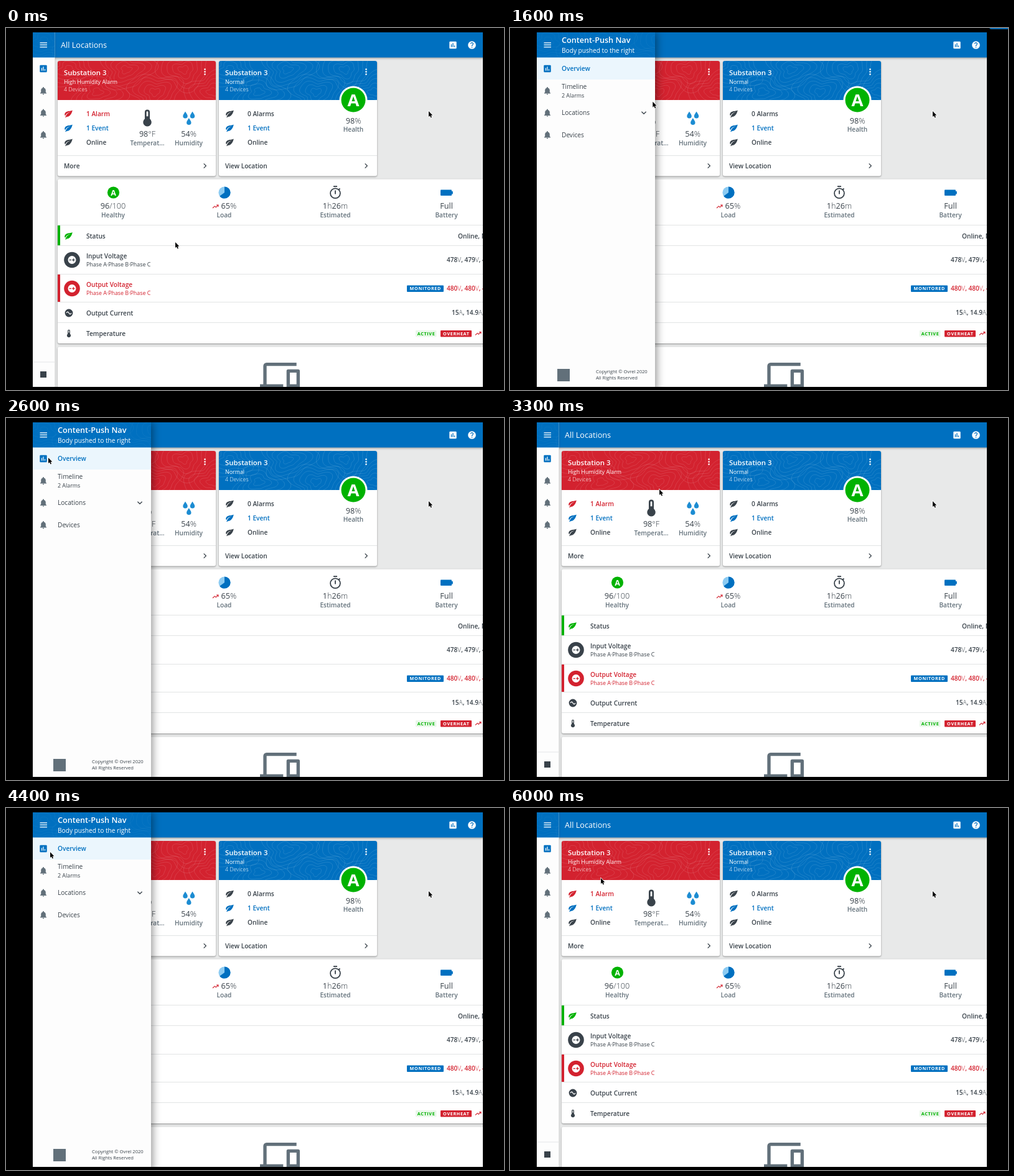
Animation of 800x583 px, one loop 6100 ms. Source, as an HTML page with a canvas:

```html
<!DOCTYPE html>
<html lang="en">
<head>
<meta charset="utf-8">
<title>Content-Push Nav</title>
<style>
html, body { margin: 0; width: 100%; height: 100%; overflow: hidden; background: #000; }
canvas { display: block; }
</style>
</head>
<body>
<canvas id="stage" width="800" height="583"></canvas>
<script>
const ctx = document.getElementById('stage').getContext('2d');
const LOOP = 6100, STEP = 100;
const BLUE = '#0070c0', RED = '#d3222f', GREEN = '#00b200', INK = '#39424a', GRAY = '#62707a', WHITE = '#fff';
const SMALL = 8.87, BODY = 10.13, LARGE = 12.66;

// Times at which the drawer is open, and the pointer's path as [time, x, y].
const openSpans = [[800, 1700], [2500, 3300], [4400, 5300]];
const cornerSpan = [400, 2400];
const pointerPath = [
  [0, 272, 345], [200, 250, 305], [700, 88, 115], [800, 70, 95], [1100, 72, 85],
  [1650, 245, 122], [1900, 138, 129], [2450, 75, 72], [2600, 68, 64], [2800, 72, 70],
  [3300, 240, 115], [3600, 236, 130], [3900, 148, 127], [4300, 80, 80], [4400, 71, 71],
  [4700, 74, 76], [5300, 240, 112], [5700, 226, 118], [6000, 146, 113]
];

const icons = {
  leaf: 'M17 8C8 10 5.9 16.2 3.8 21.3L5.7 22 6.7 19.7C7.1 19.9 7.6 20 8 20 19 20 22 3 22 3 21 5 14 5.3 9 6.3 4 7.3 2 11.5 2 13.5 2 15.5 3.75 17.25 3.75 17.25 7 8 17 8 17 8Z',
  bell: 'M12 22c1.1 0 2-.9 2-2h-4c0 1.1.9 2 2 2zm6-6v-5c0-3.1-1.6-5.6-4.5-6.3V4a1.5 1.5 0 0 0-3 0v.7C7.6 5.4 6 7.9 6 11v5l-2 2v1h16v-1z',
  chart: 'M5 3H19a2 2 0 0 1 2 2V19a2 2 0 0 1-2 2H5a2 2 0 0 1-2-2V5a2 2 0 0 1 2-2zM7 10v7h2v-7zM11 7v10h2V7zM15 13v4h2v-4z',
  help: 'M12 2a10 10 0 1 0 0 20 10 10 0 1 0 0-20zm1 17h-2v-2h2zm2.1-7.75l-.9.9C13.5 12.9 13 13.5 13 15h-2v-.5c0-1.1.5-2.1 1.2-2.8l1.2-1.3c.4-.4.6-.9.6-1.4a2 2 0 0 0-4 0H8a4 4 0 0 1 8 0c0 .9-.4 1.7-.9 2.25z',
  thermo: 'M15 13V5A3 3 0 0 0 9 5V13A5 5 0 1 0 15 13M12 4A1 1 0 0 1 13 5V10H11V5A1 1 0 0 1 12 4Z',
  drop: 'M12 3C14 7 18 11 18 15A6 6 0 0 1 6 15C6 11 10 7 12 3Z',
  devices: 'M4 6h18V4H4a2 2 0 0 0-2 2v11H0v3h14v-3H4zm19 2h-6a1 1 0 0 0-1 1v10a1 1 0 0 0 1 1h6a1 1 0 0 0 1-1V9a1 1 0 0 0-1-1zm-1 9h-4v-7h4z'
};
for (const name in icons) icons[name] = new Path2D(icons[name]);

function rect(x, y, w, h, color, radius = 0) {
  ctx.fillStyle = color;
  ctx.beginPath();
  ctx.roundRect(x, y, w, h, radius);
  ctx.fill();
}

function circle(x, y, r, color) {
  ctx.fillStyle = color;
  ctx.beginPath();
  ctx.arc(x, y, r, 0, Math.PI * 2);
  ctx.fill();
}

function line(points, color, width) {
  ctx.strokeStyle = color;
  ctx.lineWidth = width;
  ctx.beginPath();
  for (const [x, y] of points) ctx.lineTo(x, y);
  ctx.stroke();
}

function icon(name, cx, cy, color, scale = 0.633) {
  ctx.save();
  ctx.translate(cx, cy);
  ctx.scale(scale, scale);
  ctx.translate(-12, -12);
  ctx.fillStyle = color;
  ctx.fill(icons[name], 'evenodd');
  ctx.restore();
}

function setFont(size, weight) {
  ctx.font = `${weight} ${size}px "Open Sans", sans-serif`;
}

function text(str, x, y, color = INK, size = BODY, weight = 600, align = 'left') {
  setFont(size, weight);
  ctx.textAlign = align;
  ctx.fillStyle = color;
  ctx.fillText(str, x, y);
}

// Alternates strong and light runs, separated by "|".
function valueText(str, x, y, color = INK, size = BODY, centered = false) {
  const runs = str.split('|');
  const weight = i => i % 2 ? 300 : size === LARGE ? 500 : 600;
  if (centered) {
    runs.forEach((run, i) => { setFont(size, weight(i)); x -= ctx.measureText(run).width / 2; });
  }
  runs.forEach((run, i) => {
    text(run, x, y, color, size, weight(i));
    x += ctx.measureText(run).width;
  });
}

function clipped(x, y, w, h, draw) {
  ctx.save();
  ctx.beginPath();
  ctx.rect(x, y, w, h);
  ctx.clip();
  draw();
  ctx.restore();
}

function shadowed(blur, dx, dy, alpha, draw) {
  ctx.save();
  ctx.shadowColor = `rgba(0,0,0,${alpha})`;
  ctx.shadowBlur = blur;
  ctx.shadowOffsetX = dx;
  ctx.shadowOffsetY = dy;
  draw();
  ctx.restore();
}

function panel(x, y, w, h) {
  shadowed(2.5, 0, 1, 0.4, () => rect(x, y, w, h, WHITE, 3));
}

// Nested wavy rings that read as a topographic map.
function contours(x, y, w, h, alpha) {
  clipped(x, y, w, h, () => {
    ctx.strokeStyle = `rgba(255,255,255,${alpha})`;
    ctx.lineWidth = 0.6;
    for (let k = 0; k < 6; k++) {
      const cx = x + 18 + k * 46, cy = y + (k % 2 ? 50 : 14);
      for (let r = 6; r < 34; r += 6) {
        ctx.beginPath();
        for (let i = 0; i <= 60; i++) {
          const a = i / 60 * Math.PI * 2;
          const d = r * (1 + 0.2 * Math.sin(3 * a + k) + 0.1 * Math.sin(5 * a + r + k * 2));
          ctx.lineTo(cx + 1.35 * d * Math.cos(a), cy + d * Math.sin(a));
        }
        ctx.stroke();
      }
    }
  });
}

function trend(x, y) {
  line([[x, y + 2.5], [x + 3.3, y - 0.6], [x + 5.2, y + 1.2], [x + 8.8, y - 2.2]], RED, 1.1);
  line([[x + 6.2, y - 2.4], [x + 9, y - 2.4], [x + 9, y + 0.4]], RED, 1.1);
}

function chevron(x, y) {
  line([[x - 1.8, y - 3.6], [x + 1.8, y], [x - 1.8, y + 3.6]], INK, 1.3);
}

function tag(str, x, y, w, background, color) {
  rect(x, y, w, 10.5, background, 1);
  ctx.letterSpacing = '0.65px';
  text(str, x + w / 2 + 0.3, y + 7.9, color, 7.2, 700, 'center');
  ctx.letterSpacing = '0px';
}

function card(x, color, status, alarms, alarmColor, action) {
  panel(x, 53, 254, 185.5);
  rect(x, 53, 254, 63, color, [3, 3, 0, 0]);
  contours(x, 53, 254, 63, 0.2);
  text('Substation 3', x + 10, 76, WHITE, 11.4);
  text(status, x + 10, 90, WHITE, SMALL, 400);
  text('4 Devices', x + 10, 102, WHITE, SMALL, 300);
  for (let i = 0; i < 3; i++) circle(x + 236.5, 66.5 + i * 4, 1.3, WHITE);
  [[alarms, alarmColor], ['1 Event', BLUE], ['Online', INK]].forEach(([label, tint], i) => {
    icon('leaf', x + 17.5, 138 + i * 23, tint);
    text(label, x + 46, 141.5 + i * 23, tint);
  });
  rect(x, 205, 254, 1, '#e2e4e5');
  text(action, x + 10, 226);
  chevron(x + 236.5, 222);
}

function metric(x, value, label, y = 291) {
  valueText(value, x, y, INK, LARGE, true);
  text(label, x, y + 13.5, GRAY, BODY, 600, 'center');
}

function cards() {
  card(83, RED, 'High Humidity Alarm', '1 Alarm', RED, 'More');
  icon('thermo', 227, 145, INK, 1.35);
  metric(227, '98|°F', 'Temperat...', 175);
  for (const [x, y] of [[288, 140], [299.5, 140], [293.8, 150.5]]) icon('drop', x, y, '#1c8cd2', 0.62);
  metric(293.5, '54|%', 'Humidity', 175);

  card(342, BLUE, 'Normal', '0 Alarms', INK, 'View Location');
  circle(558, 116, 22.5, WHITE);
  circle(558, 116, 19.5, GREEN);
  text('A', 558, 126, WHITE, 27.5, 700, 'center');
  metric(558, '98|%', 'Health', 153.5);
}

function summary() {
  circle(172.5, 265, 9.6, GREEN);
  text('A', 172.5, 269.6, WHITE, 12.5, 700, 'center');
  metric(172, '96|/100', 'Healthy');

  circle(351, 265, 9.6, '#8ccbf2');
  ctx.fillStyle = BLUE;
  ctx.beginPath();
  ctx.moveTo(351, 265);
  ctx.arc(351, 265, 9.6, -Math.PI / 2, Math.PI * 0.8);
  ctx.fill();
  trend(332, 287.5);
  valueText('65|%', 345.5, 291, INK, LARGE);
  text('Load', 350.5, 304.5, GRAY, BODY, 600, 'center');

  ctx.strokeStyle = INK;
  ctx.lineWidth = 1.8;
  ctx.beginPath();
  ctx.arc(529, 266.3, 7.9, 0, Math.PI * 2);
  ctx.stroke();
  rect(526, 254.2, 6, 1.9, INK);
  rect(528.1, 261.5, 1.8, 6, INK);
  line([[534.5, 260.5], [536.5, 258.5]], INK, 1.8);
  metric(529, '1|h|26|m', 'Estimated');

  rect(698, 260.5, 18, 9.5, BLUE, 1);
  rect(716, 263, 1.8, 4.5, BLUE);
  metric(707.5, 'Full', 'Battery');
}

function voltageIcon(y, color) {
  circle(106, y, 12.8, color);
  circle(106, y, 6.5, WHITE);
  rect(101.5, y - 0.6, 3.4, 1.3, color);
  rect(106.2, y - 0.6, 4.4, 1.3, color);
  rect(107.7, y - 2.2, 1.3, 4.4, color);
}

function voltageRow(y, label, values, color) {
  voltageIcon(y, color);
  text(label, 129, y - 2.5, color);
  text('Phase A·Phase B·Phase C', 129, y + 10, color, SMALL, 400);
  valueText(values, 708, y + 3.5, color);
}

function details() {
  panel(83, 243.5, 720, 264.5);
  summary();
  for (const y of [317, 350, 396, 441, 474]) rect(83, y, 690, 1, '#e2e4e5');

  rect(83, 318, 4, 32, GREEN);
  icon('leaf', 100.5, 334.5, GREEN);
  text('Status', 129, 338.5);
  text('Online, Normal', 726, 338.5);

  voltageRow(373.5, 'Input Voltage', '478|V|, 479|V|, 473|V', INK);
  rect(83, 397, 4, 44, RED);
  voltageRow(419.5, 'Output Voltage', '480|V|, 480|V|, 480|V', RED);
  tag('MONITORED', 644, 414.5, 59, BLUE, WHITE);

  circle(101, 459, 6.4, INK);
  ctx.strokeStyle = WHITE;
  ctx.lineWidth = 1.3;
  ctx.beginPath();
  for (let i = -4; i <= 4; i += 0.5) ctx.lineTo(101 + i, 459 + 1.9 * Math.sin(i * Math.PI / 4));
  ctx.stroke();
  text('Output Current', 129, 462.5);
  valueText('15|A|, 14.9|A|, 15|A', 716, 462);

  icon('thermo', 101, 492, INK);
  text('Temperature', 129, 495.5);
  tag('ACTIVE', 658, 487, 33.5, '#e9f7e9', GREEN);
  tag('OVERHEAT', 698, 487, 50, RED, WHITE);
  trend(754, 492);
}

function appBar() {
  shadowed(3, 0, 1, 0.3, () => rect(43, 7, 724, 40.5, BLUE));
  text('All Locations', 88, 32, WHITE, LARGE, 400);
  icon('chart', 718, 27.5, WHITE);
  icon('help', 748.5, 27.5, WHITE);
}

function drawer(open) {
  const w = open ? 190 : 35.5;
  shadowed(open ? 13 : 3, open ? 2 : 0.5, 0, open ? 0.45 : 0.25, () => rect(43, 7, w, 580, '#fdfdfd'));
  rect(43, 7, w, 40.5, BLUE);
  contours(43, 7, w, 40.5, 0.07);
  for (let i = 0; i < 3; i++) rect(54.5, 23.2 + i * 3.4, 11.5, 1.3, WHITE);
  if (open) rect(43, 48, w, 35, '#ebf6fd');
  icon('chart', 60, 65.5, BLUE);
  for (const y of [101, 136.5, 172]) icon('bell', 60, y, GRAY);
  if (!open) {
    rect(43, 537.5, w, 1, '#e4e6e7');
    rect(55, 553, 10, 10, INK);
    return;
  }
  text('Content-Push Nav', 83, 24, WHITE, LARGE);
  text('Body pushed to the right', 83, 40, WHITE, BODY, 400);
  text('Overview', 83, 69, BLUE);
  text('Timeline', 83, 98, INK, BODY, 400);
  text('2 Alarms', 83, 111.5, INK, SMALL, 400);
  text('Locations', 83, 140, INK, BODY, 400);
  text('Devices', 83, 175.5, INK, BODY, 400);
  line([[211.4, 134.7], [215, 138.3], [218.6, 134.7]], INK, 1.3);
  rect(76, 549, 20, 20, GRAY);
  text('Copyright © Ovrel 2020', 138, 555.5, INK, 7.6, 400);
  text('All Rights Reserved', 138, 565.5, INK, 7.6, 400);
}

function pointer(x, y) {
  ctx.save();
  ctx.translate(x, y);
  ctx.beginPath();
  for (const [px, py] of [[0, 0], [0, 9], [2, 7.2], [3.5, 10.5], [5, 9.8], [3.6, 6.7], [6.3, 6.5]]) ctx.lineTo(px, py);
  ctx.closePath();
  ctx.strokeStyle = 'rgba(255,255,255,0.9)';
  ctx.lineWidth = 1.4;
  ctx.stroke();
  ctx.fillStyle = '#000';
  ctx.fill();
  ctx.restore();
}

function pointerAt(t) {
  const next = pointerPath.findIndex(p => p[0] > t);
  if (next < 0) return pointerPath[pointerPath.length - 1].slice(1);
  const [t0, x0, y0] = pointerPath[next - 1], [t1, x1, y1] = pointerPath[next];
  const k = (t - t0) / (t1 - t0);
  return [x0 + (x1 - x0) * k, y0 + (y1 - y0) * k];
}

const within = (t, [from, to]) => t >= from && t < to;

function render(t) {
  rect(0, 0, 800, 583, '#000');
  if (within(t, cornerSpan)) rect(770, -4, 34, 6, '#0a6cb4', 3);
  clipped(43, 7, 723, 571, () => {
    rect(43, 7, 724, 571, '#e8e9e9');
    cards();
    details();
    panel(83, 513.5, 720, 90);
    icon('devices', 440, 560.3, GRAY, 2.667);
    appBar();
    drawer(openSpans.some(span => within(t, span)));
    pointer(679, 134);
    pointer(...pointerAt(t));
  });
}

const start = performance.now();
let shown = -1;
function tick() {
  const elapsed = Math.max(0, performance.now() - start) % LOOP;
  const t = Math.floor(elapsed / STEP) * STEP;
  if (t !== shown) render(shown = t);
  requestAnimationFrame(tick);
}
tick();
</script>
</body>
</html>
```
